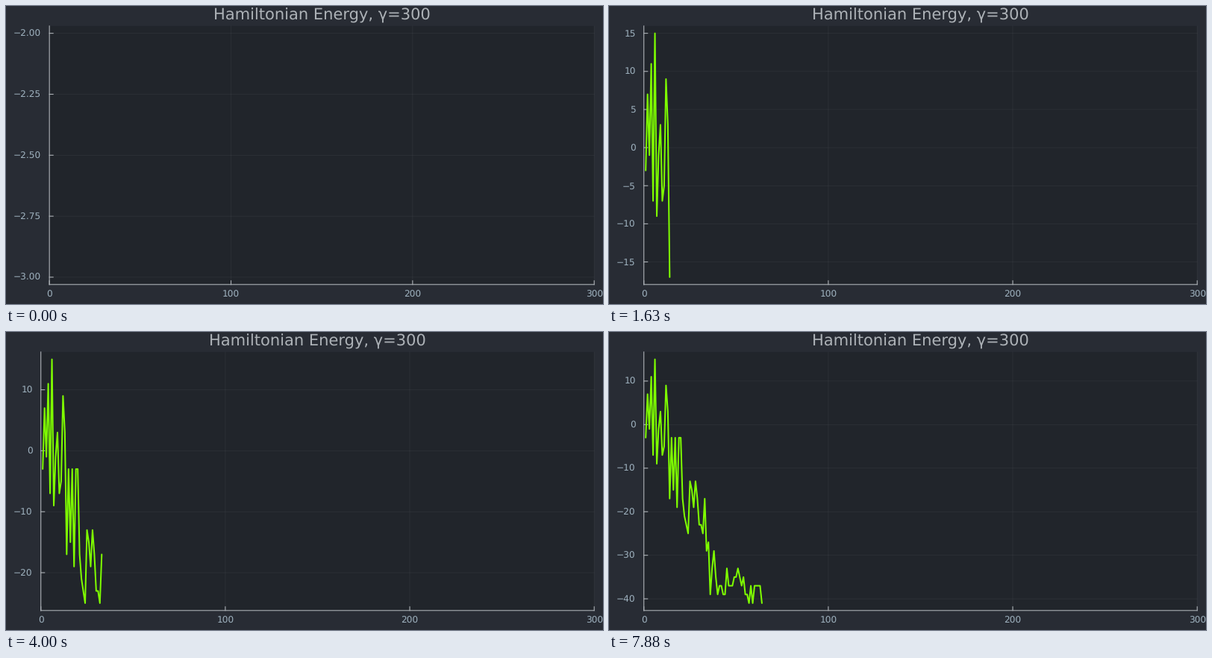
Animation, 800 px wide and 400 px high, one loop 8000 ms. Source, as a matplotlib script:

```python
import math

import matplotlib.pyplot as plt
from matplotlib.animation import FuncAnimation

W, H, DPI = 800, 400, 100
PT = 72 / DPI  # points per pixel
TOP, BOTTOM, RIGHT = 26.8, 373.8, 788.2
TICK_FONT, TITLE_FONT = 12.1, 21
BG, PANEL, FG, TEXT, LINE = "#282c34", "#21252b", "#adb2b7", "#9eb1be", "#7fff00"

ENERGY = [
    -3, 7, -1, 11, -7, 15, -9, -1, 3, -7, -5, 9, 3, -17, -3, -15,
    -3, -19, -3, -3, -17, -21, -23, -25, -13, -15, -19, -13, -17, -23, -23, -25,
    -17, -29, -27, -39, -33, -29, -35, -39, -37, -37, -39, -39, -33, -37, -37, -37,
    -35, -35, -33, -35, -37, -35, -39, -39, -41, -37, -41, -37, -37, -37, -37, -41,
]
NICENESS = {1: 1, 5: 0.9, 2: 0.7, 2.5: 0.5, 3: 0.2}

plt.rcParams.update({"font.family": "DejaVu Sans", "text.hinting": "none"})
fig = plt.figure(figsize=(W / DPI, H / DPI), dpi=DPI, facecolor=BG)
ax = fig.add_axes([0, 0, 1, 1])


def nice_ticks(lo, hi):
    """Return the tick step and values that best fill the range."""
    best = None
    for power in (-1, 0, 1):
        for q, nice in NICENESS.items():
            step = q * 10 ** power
            first, last = math.ceil(lo / step), math.floor(hi / step)
            count = last - first + 1
            if not 4 <= count <= 8:
                continue
            cover = 1.5 * (hi - lo) / ((count - 1) * step)
            score = (1 - abs(count - 5) / 5) / 4 + cover / 3 + nice / 4
            score += (first <= 0 <= last) / 6
            option = (round(score, 6), step, first, last)
            best = max(best, option) if best else option
    _, step, first, last = best
    return step, [k * step for k in range(first, last + 1)]


def stroke(xs, ys, color=FG, width=1.1, **style):
    ax.plot(xs, ys, color=color, lw=width * PT, snap=False, **style)


def label(x, y, text, size=TICK_FONT, color=TEXT, ha="center"):
    ax.text(x, y, text, fontsize=size * PT, color=color, ha=ha, va="baseline")


def text_width(text):
    """Advance width of a numeric label in pixels."""
    em = {"\u2212": 0.838, ".": 0.318}
    return 12 * sum(em.get(c, 0.636) for c in text)


def draw(i):
    ax.clear()
    ax.set(xlim=(0, W), ylim=(H, 0))
    ax.axis("off")

    values = ENERGY[:i + 1]
    low, high = min(values), max(values)
    if low == high:
        high = low + 1
    pad = 0.03 * (high - low)
    low, high = low - pad, high + pad

    step, ticks = nice_ticks(low, high)
    digits = 2 if step < 1 else 0
    names = [f"{t:.{digits}f}".replace("-", "\u2212") for t in ticks]
    left = 21.4 + max(map(text_width, names))

    def px(x):
        return left + (RIGHT - left) * x / 300

    def py(y):
        return BOTTOM - (BOTTOM - TOP) * (y - low) / (high - low)

    ax.add_patch(plt.Rectangle((left, TOP), RIGHT - left, BOTTOM - TOP,
                               fc=PANEL, lw=0, snap=False))

    x_ticks = range(0, 301, 100)
    for x in map(px, x_ticks):
        stroke([x, x], [TOP, BOTTOM], width=0.7, alpha=0.1)
    for y in map(py, ticks):
        stroke([left, RIGHT], [y, y], width=0.7, alpha=0.1)

    stroke([left, RIGHT], [BOTTOM, BOTTOM])
    stroke([left, left], [BOTTOM, TOP])
    for t in x_ticks:
        stroke([px(t)] * 2, [BOTTOM, BOTTOM - 5])
        label(px(t), 391, str(t))
    for t, name in zip(ticks, names):
        stroke([left, left + 5], [py(t)] * 2)
        label(left - 11, py(t) + 4.3, name, ha="right")

    label((left + RIGHT) / 2, 18.5, "Hamiltonian Energy, γ=300", TITLE_FONT, FG)

    if len(values) > 1:
        stroke([px(n + 1) for n in range(len(values))], [py(v) for v in values],
               LINE, 2, solid_capstyle="round", solid_joinstyle="round")
    return []


anim = FuncAnimation(fig, draw, frames=len(ENERGY), init_func=lambda: [],
                     interval=125, repeat=True, repeat_delay=0)
plt.show()
```
